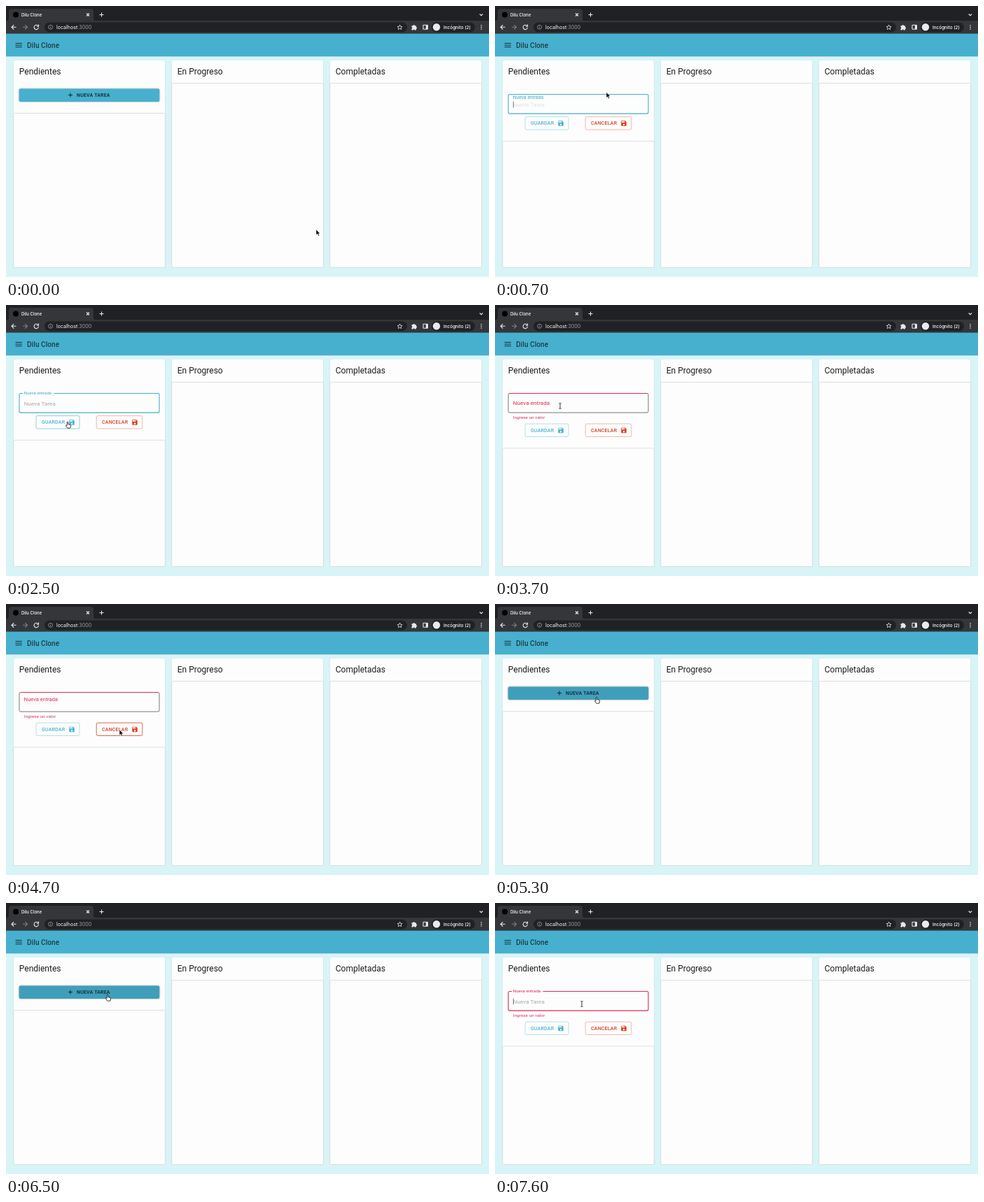
Animation, 690 px wide and 388 px high, one loop 8 s. Source, as an HTML page:

```html
<!DOCTYPE html>
<html lang="es">
<head>
<meta charset="utf-8">
<title>Tablero</title>
<style>
html, body { margin: 0; width: 100%; height: 100%; overflow: hidden; background: #d8f4f7; }
svg { display: block; width: 690px; height: 388px; font-family: Roboto, Arial, sans-serif; }
.ui { font-family: Inter, sans-serif; fill: #fff; }
.icon { fill: none; stroke: #e8eaed; stroke-width: 1.1; }
.title { font-size: 12px; fill: #1c1c1c; }
.btn { font-size: 7px; font-weight: 500; letter-spacing: .2px; }
.card { fill: #fdfdfd; filter: drop-shadow(0 .6px .7px #0004); }
.list { fill: #fdfdfd; stroke: #cfd4d5; stroke-width: .7; }
.box { fill: #fdfdfd; stroke-width: .8; }
</style>
</head>
<body>
<svg viewBox="0 0 690 388">
  <defs>
    <path id="disk" transform="scale(.417)" d="M17 3H5a2 2 0 0 0-2 2v14a2 2 0 0 0 2 2h14a2 2 0 0 0 2-2V7zM12 19a3 3 0 1 1 0-6 3 3 0 0 1 0 6zM15 9H5V5h10z"/>
  </defs>

  <!-- browser -->
  <rect width="690" height="40" fill="#202124"/>
  <path d="M1 21q3 0 3-3V8q0-4 4-4h113q4 0 4 4v10q0 3 3 3H690V40H0V21z" fill="#35363a"/>
  <rect x="55" y="23.5" width="518" height="14" rx="7" fill="#202124"/>
  <rect x="608" y="23.5" width="62" height="14" rx="7" fill="#202124"/>
  <circle cx="14" cy="12.5" r="4" fill="#000"/>
  <text class="ui" x="22" y="14.8" font-size="6" font-weight="500">Dilu Clone</text>
  <text class="ui" x="72" y="32.8" font-size="7.1">localhost<tspan fill="#9aa0a6">:3000</tspan></text>
  <text class="ui" x="625" y="32.8" font-size="6.4" font-weight="500">Incógnito (2)</text>
  <g class="icon">
    <path d="M115 10.5l4 4m0-4l-4 4M133.500 12.500h6m-3-3v6M676.700 11.500l2.200 2.200 2.200-2.200"/>
    <path d="M14.5 30.3H8m3.2-3.2L8 30.3l3.2 3.2"/>
    <path d="M24 30.3h6.5m-3.2-3.2l3.2 3.2-3.2 3.2" stroke="#7d8085"/>
    <path d="M45.6 28.2a3.2 3.2 0 1 0 .9 2.6M46.5 26.6v2.6h-2.6"/>
    <path d="M60.600 30.300a3 3 0 1 0 6 0 3 3 0 1 0-6 0M63.600 30v2m0-3.600v.8" stroke="#9aa0a6" stroke-width=".8"/>
    <path stroke-width=".8" d="M562.6 27l1 2.3 2.5.2-1.9 1.6.6 2.5-2.2-1.3-2.2 1.3.6-2.5-1.9-1.6 2.5-.2z"/>
    <rect x="596" y="27.3" width="6.4" height="6" rx=".6"/>
  </g>
  <g fill="#e8eaed">
    <path d="M579.5 28.2h2a1.2 1.2 0 0 1 2.4 0h2v2a1.2 1.2 0 0 1 0 2.4v1.8h-2.2a1 1 0 0 0-2 0h-2.2v-2a1.2 1.2 0 0 0 0-2.3z"/>
    <path d="M599.8 27.3h2.6v6h-2.6z"/>
    <circle cx="615" cy="30.3" r="5.2"/>
    <path d="M679 27.800v5.300" stroke="#e8eaed" stroke-width="1.6" stroke-linecap="round" stroke-dasharray="0 2.6"/>
  </g>

  <!-- page -->
  <rect y="39.6" width="690" height="32.7" fill="#47b0ce"/>
  <path d="M13.5 53.4h9.4m-9.4 2.7h9.4m-9.4 2.7h9.4" stroke="#1d3137"/>
  <text x="30" y="59.8" font-size="10" font-weight="500" letter-spacing=".075" fill="#1d3d47">Dilu Clone</text>
  <g id="columns"></g>

  <g id="add">
    <rect id="addBox" x="18.7" y="118.5" width="200.5" height="18.5" rx="2" style="filter:drop-shadow(0 .8px .8px #0006)"/>
    <path d="M89 127.5h6m-3-3v6" stroke="#10242a"/>
    <text class="btn" x="101" y="130" fill="#10242a">NUEVA TAREA</text>
  </g>

  <g id="form">
    <rect id="field" x="19" y="126.5" width="200" height="27.6" rx="2" fill="#fdfdfd"/>
    <path id="topLine" d="M20.5 126.5h197" stroke="#dc2450" stroke-width=".8"/>
    <rect id="notch" x="24" y="125" width="44.5" height="3" fill="#fdfdfd"/>
    <text id="hint" x="25.8" y="143.6" font-size="8" letter-spacing=".075" fill="#a8a8a8">Nueva Tarea</text>
    <text id="label" font-size="8" letter-spacing=".075">Nueva entrada</text>
    <path id="caret" d="M26.3 136.5v9" stroke="#555" stroke-width=".8"/>
    <text id="help" x="25.8" y="162.8" font-size="6" letter-spacing=".2" fill="#dc2450">Ingrese un valor</text>
    <g id="actions">
      <g id="save" fill="#45b4d0">
        <rect class="box" x="43" y="158.6" width="62" height="18.4" rx="2"/>
        <text class="btn" x="51" y="170.4">GUARDAR</text>
        <use href="#disk" x="89" y="163"/>
      </g>
      <g id="cancel" fill="#d8401f">
        <rect class="box" x="129.2" y="158.6" width="65.6" height="18.4" rx="2"/>
        <text class="btn" x="137" y="170.4">CANCELAR</text>
        <use href="#disk" x="179" y="163"/>
      </g>
    </g>
  </g>

  <g id="pointer" stroke-linejoin="round">
    <path id="arrow" d="M0 0v8l1.9-1.7 1.3 2.9 1.4-.6-1.3-2.8h2.5z" fill="#000" stroke="#fff" stroke-width=".6"/>
    <path id="hand" d="M-.8 .7q.8-1.3 1.6 0v3l3 .7q1 .3.8 1.5l-.7 3.3h-4.2l-2.3-3.6q.2-1.2 1.8-.2z" fill="#fff" stroke="#111" stroke-width=".8"/>
    <path id="beam" d="M-1.5-4q1.5 0 1.5 1 0-1 1.5-1M0-3v6M-1.5 4q1.5 0 1.5-1 0 1 1.5 1" fill="none" stroke="#222" stroke-width=".9"/>
  </g>
</svg>
<script>
const LOOP = 8000, STEP = 100, TRIP = 400, BLINK = 500;
const $ = id => document.getElementById(id);
const set = (el, attrs) => { for (const k in attrs) el.setAttribute(k, attrs[k]); };
const show = (id, on) => { $(id).style.display = on ? '' : 'none'; };
const clamp = v => Math.max(0, Math.min(1, v));
const smooth = k => k * k * (3 - 2 * k);
const easeOut = k => 1 - (1 - k) ** 3;

// What the user does to the form, and when
const actions = [
  { at: 0, does: 'close' }, { at: 700, does: 'focus' }, { at: 2700, does: 'blur' },
  { at: 4200, does: 'focus' }, { at: 4700, does: 'blur' }, { at: 4900, does: 'close' },
  { at: 5500, does: 'focus' }, { at: 6000, does: 'blur' }, { at: 6200, does: 'close' },
  { at: 6600, does: 'focus' }
];
const firstError = 2800;

// Where the pointer stops, with its time of arrival
const stops = [
  { at: 0, x: 443, y: 320 }, { at: 400, x: 159, y: 123.5 }, { at: 1200, x: 160, y: 141 },
  { at: 1800, x: 162, y: 167 }, { at: 2400, x: 88, y: 167 }, { at: 3700, x: 93, y: 144.5 },
  { at: 4000, x: 38, y: 142 }, { at: 4700, x: 162, y: 180 }, { at: 5200, x: 145, y: 133 },
  { at: 5800, x: 165, y: 180 }, { at: 6500, x: 145, y: 131 }, { at: 7000, x: 124, y: 144.5 }
];

function pointerAt(t) {
  const i = stops.findIndex(s => s.at > t);
  if (i < 0) return stops.at(-1);
  const a = stops[i - 1], b = stops[i], trip = Math.min(TRIP, b.at - a.at);
  const k = smooth(clamp(1 - (b.at - t) / trip));
  return { x: a.x + (b.x - a.x) * k, y: a.y + (b.y - a.y) * k };
}

$('columns').innerHTML = ['Pendientes', 'En Progreso', 'Completadas'].map((name, i) => {
  const x = 10.8 + i * 226;
  return `<rect class="card" x="${x}" y="78" width="216.6" height="296.5" rx="2"/>
    <text class="title" x="${x + 8}" y="98">${name}</text>
    <rect class="list" id="list${i}" x="${x}" y="110.5" width="216.6" height="264" rx="1.5"/>`;
}).join('');

function paintButton(id, hover, [rest, active, fill]) {
  set($(id).firstElementChild, { stroke: hover ? active : rest, fill: hover ? fill : '#fdfdfd' });
}

function draw(now) {
  const t = Math.floor(now % LOOP / STEP) * STEP;
  const last = actions.findLast(a => a.at <= t), age = t - last.at;
  const open = last.does !== 'close', focused = last.does === 'focus', error = t >= firstError;
  const turn = easeOut(clamp((age + 65) / 200)), rise = focused ? turn : 1 - turn;
  const shift = error ? 11.5 : 0, top = open ? 193.5 + shift : 153.5;

  const { x, y } = pointerAt(t);
  const over = (left, upper, w, h) => x > left && x < left + w && y > upper && y < upper + h;
  const onAdd = !open && over(19, 118, 200, 19);
  const onSave = open && over(43, 158 + shift, 62, 19);
  const onCancel = open && over(129, 158 + shift, 66, 19);
  const onField = open && over(19, 126, 200, 28);

  set($('list0'), { y: top, height: 374.5 - top });
  show('add', !open);
  show('form', open);
  show('help', error);
  show('notch', rise > .95);
  show('topLine', error && !focused);
  show('caret', focused && age % (2 * BLINK) < BLINK);
  set($('addBox'), { fill: onAdd ? '#3f9fba' : '#47b0ce' });
  set($('field'), {
    stroke: !focused ? '#555' : error ? '#cf2d54' : '#47adc8',
    'stroke-width': focused ? 1.1 : .8
  });
  set($('label'), {
    fill: error ? '#dc2450' : '#3aa9c2',
    transform: `translate(25.8 ${143.3 - 14.9 * rise}) scale(${1 - .25 * rise})`
  });
  set($('hint'), { opacity: rise > .95 ? 1 : rise * .5 });
  set($('actions'), { transform: `translate(0 ${shift})` });
  paintButton('save', onSave, ['#9fd8e6', '#6cc5da', '#f6fcfd']);
  paintButton('cancel', onCancel, ['#eba797', '#d8401f', '#fbefec']);

  // The pointer keeps its plain arrow just after a click
  const clicked = open && age < 200;
  const kind = clicked ? 'arrow' : onAdd || onSave || onCancel ? 'hand' : onField ? 'beam' : 'arrow';
  for (const k of ['arrow', 'hand', 'beam']) show(k, k === kind);
  set($('pointer'), { transform: `translate(${x} ${y})` });
}

const start = performance.now();
(function loop() {
  draw(performance.now() - start);
  requestAnimationFrame(loop);
})();
</script>
</body>
</html>
```
